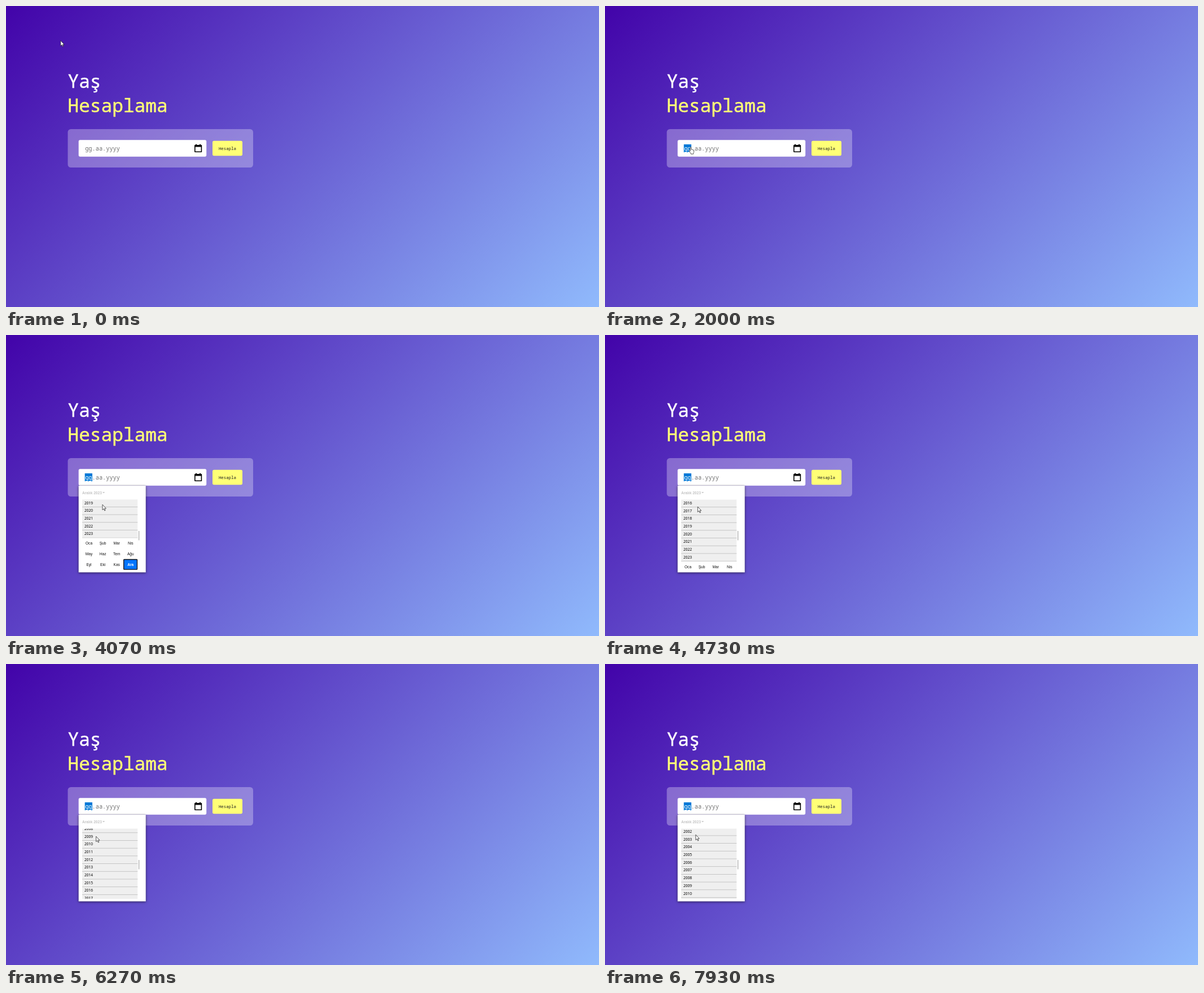
Write an HTML page that moves like this. It is 1051 px wide and 533 px high and loops after 8 s.

```html
<!DOCTYPE html>
<html lang="tr">
<head>
<meta charset="utf-8">
<title>Yaş Hesaplama</title>
<style>
html, body { margin: 0; width: 100%; height: 100%; overflow: hidden; }
svg { display: block; width: 1051px; height: 533px; background: linear-gradient(135deg, #4203a9, #90bafc); }
.mono { font-family: "Roboto Mono", "Noto Sans Mono", monospace; }
.title { font-size: 32.8px; stroke-width: .5; }
.white { fill: #fff; stroke: #fff; }
.yellow { fill: #ffff76; stroke: #ffff76; }
.field { font-size: 10.3px; fill: #6f6f6f; }
.ui { font: 6.6px "Liberation Sans", Arial, sans-serif; fill: #111; }
.years { font: 6.6px "Noto Sans", "Open Sans", sans-serif; fill: #000; }
.mid { text-anchor: middle; }
#popup > rect { filter: drop-shadow(0 1px 2px rgba(0, 0, 0, .6)); }
</style>
</head>
<body>
<svg viewBox="0 0 1051 533">
  <clipPath id="clip"><rect id="window" x="135" y="291.5" width="98.5"/></clipPath>

  <g class="mono">
    <text class="title white" x="109.5" y="144.5">Yaş</text>
    <text class="title yellow" x="109.5" y="188">Hesaplama</text>
    <rect x="109.5" y="218" width="328.5" height="68" rx="5.5" fill="#fff" fill-opacity=".3"/>
    <rect x="128.7" y="237.2" width="226.5" height="29.5" rx="2.7" fill="#fff"/>
    <rect id="mark" x="139.7" y="245" width="13.3" height="14" fill="#0078d7"/>
    <text class="field" x="140.2" y="256"><tspan id="day">gg</tspan>.aa.yyyy</text>
    <path fill-rule="evenodd" d="M336 244.7h2v1.4h5v-1.4h2v1.4h1q1.2 0 1.2 1.2v10.5q0 1.2-1.2 1.2h-10.8q-1.2 0-1.2-1.2v-10.5q0-1.2 1.2-1.2h.8zM335.6 249.6v8h10v-8z"/>
    <rect x="366" y="238.8" width="53" height="26.4" rx="2.7" fill="#ffff76"/>
    <text class="mid" x="392.4" y="255" font-size="7.4" font-weight="500" fill="#222">Hesapla</text>
  </g>

  <g id="popup" class="ui">
    <rect x="128.7" y="267" width="119" height="153.3" fill="#fff"/>
    <g id="head">
      <text x="135" y="281.5" font-weight="bold">Aralık 2023</text>
      <path d="M171 278h4.2l-2.1 2.3z"/>
    </g>
    <g id="calendar">
      <path d="M222 282.5v-7m-2.5 2.5l2.5-2.5 2.5 2.5M235 275.5v7m-2.5-2.5l2.5 2.5 2.5-2.5" fill="none" stroke="#444" stroke-width=".9"/>
      <g id="days" class="mid"></g>
      <g fill="#0075ff"><text x="138" y="412">Temizle</text><text x="238" y="412" text-anchor="end">Bugün</text></g>
    </g>
    <g id="list">
      <g clip-path="url(#clip)">
        <rect x="135" y="291" width="98.5" height="126" fill="#efefef"/>
        <g id="rows">
          <g id="years" class="years"></g>
          <rect x="134" y="359.5" width="100" height="60" fill="#fff"/>
          <rect x="208.7" y="397.5" width="23.8" height="17.6" rx=".8" fill="#0075ff" stroke="#101010" stroke-width="1.4"/>
          <g id="months" class="mid"></g>
        </g>
      </g>
      <rect x="234.6" y="347" width="2" height="16.5" fill="#c6c6c6"/>
    </g>
  </g>

  <g id="cursor" stroke="#111" stroke-width=".7" stroke-linejoin="round" fill="#fff">
    <path id="arrow" d="M.3 .3v9.4l2.2-2 1.5 3.4 1.4-.6-1.5-3.3h2.8z"/>
    <path id="hand" d="M-.9 1q0-1 .9-1t.9 1v3.6q.9-.6 1.6.3.9-.5 1.5.5 1.5-.3 1.5 1.2v2.3q0 1.4-.9 2.3v1.4h-4.4v-1l-2.6-3.5q-.7-1 0-1.5.8-.4 1.5.7z"/>
  </g>
</svg>
<script>
const $ = id => document.getElementById(id);
const label = (x, y, s, extra = "") => `<text x="${x}" y="${y}" ${extra}>${s}</text>`;
const ROW = 13.7, LOOP = 8000, FRAME = 1000 / 15, NOTCH = 4 * FRAME, WHEEL_START = 62 * FRAME;

// Fills a group with items laid out on a regular grid
function grid(id, items, cols, x, y, dx, dy, extra) {
  $(id).innerHTML += items.map((s, i) =>
    label(x + i % cols * dx, y + Math.floor(i / cols) * dy, s, extra(i))).join("");
}

const dates = Array.from({ length: 42 }, (_, i) => new Date(2023, 10, 27 + i));
grid("days", "Pt Sa Ça Pe Cu Ct Pz".split(" "), 7, 142.6, 300, 15.3, 0, () => 'fill="#555"');
grid("days", dates.map(d => d.getDate()), 7, 142.6, 315, 15.3, 15.6,
  i => dates[i].getMonth() == 11 ? "" : 'fill="#aaa"');
grid("months", "Oca Şub Mar Nis May Haz Tem Ağu Eyl Eki Kas Ara".split(" "), 4, 147, 371.3, 24.6, 18.6,
  i => i == 11 ? 'fill="#fff" font-weight="bold"' : "");

for (let year = 1999; year < 2024; year++) {
  const y = 297.2 + (year - 2019) * ROW;
  $("years").innerHTML += label(139, y + 2.3, year) +
    `<rect x="135" y="${y + 6.8}" width="98.5" height=".8" fill="#bbb"/>`;
}

// Wheel notches turned, scroll offset
const scrollKeys = [[0, 0], [4.5, 74.5], [8, 145], [11.5, 197.3], [14.5, 232.4]];

// Time, x, y
const pointerKeys = [
  [200, 96.5, 61], [467, 73, 2], [1067, 175, 276], [1800, 152, 249.5], [2200, 152, 249.5],
  [2667, 164, 294], [3133, 156, 281], [3400, 156, 281], [4067, 170.7, 300],
  [5267, 158.7, 306.7], [7933, 160.5, 302]
];

const clamp = v => Math.max(0, Math.min(1, v));

// Values of a key list at a position, linear between keys
function track(keys, at) {
  const next = keys.findIndex(key => key[0] > at);
  if (next < 0) return keys.at(-1).slice(1);
  if (next == 0) return keys[0].slice(1);
  const a = keys[next - 1], b = keys[next];
  const k = (at - a[0]) / (b[0] - a[0]);
  return a.slice(1).map((v, i) => v + (b[i + 1] - v) * k);
}

// Each notch moves the list for half its period, then rests
function scrollAt(t) {
  const n = Math.max(0, (t - WHEEL_START) / NOTCH);
  const turned = Math.floor(n) + clamp(n % 1 * 2);
  return track(scrollKeys, turned)[0];
}

const show = (id, on) => $(id).setAttribute("display", on ? "inline" : "none");

function draw() {
  const now = performance.now() % LOOP;
  const t = Math.floor((now + 4) / FRAME) * FRAME + .5;
  const [x, y] = track(pointerKeys, t);
  const picked = t >= 2000, listed = t >= 3400;
  const overField = t < 2400 && x > 129 && y > 237 && y < 267;

  show("mark", picked);
  $("day").setAttribute("fill", picked ? "#fff" : "#6f6f6f");
  show("popup", t >= 2130);
  show("calendar", !listed);
  show("list", listed);
  $("head").setAttribute("fill", listed ? "#c4c4c4" : "#111");
  $("window").setAttribute("height", 124.5 * clamp((t - 3330) / 200));
  $("rows").setAttribute("transform", `translate(0 ${scrollAt(t)})`);
  $("cursor").setAttribute("transform", `translate(${x} ${y})`);
  show("arrow", !overField);
  show("hand", overField);
  requestAnimationFrame(draw);
}
draw();
</script>
</body>
</html>
```
